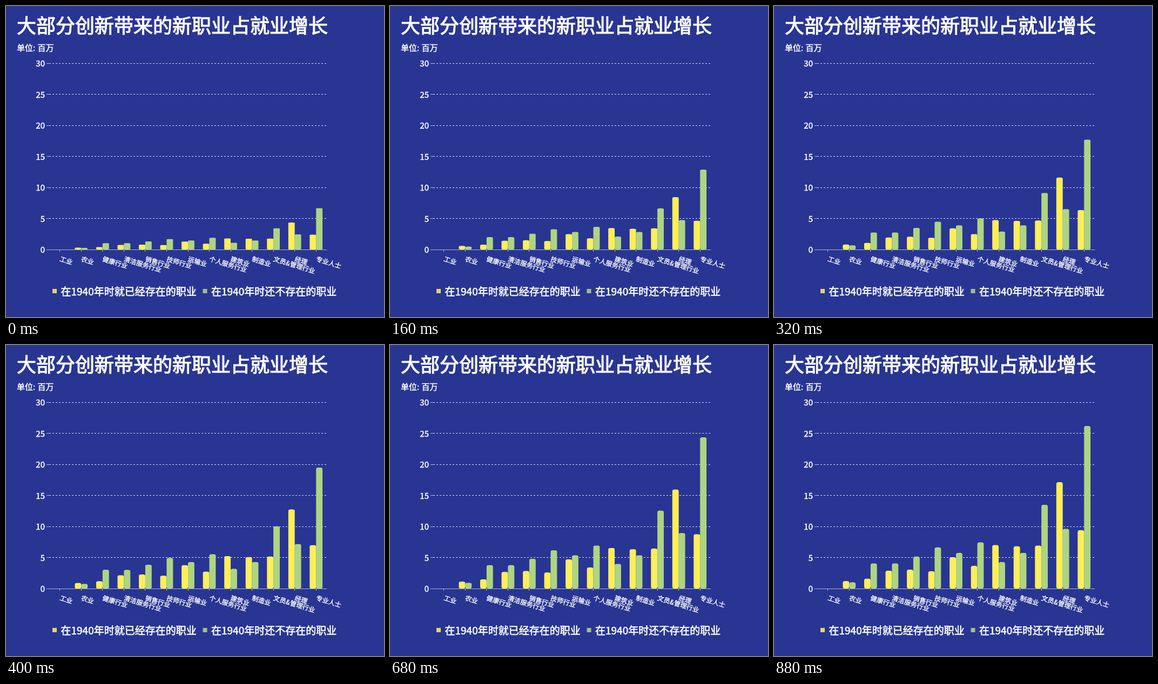
These frames come from a looping animation (700 px wide and 576 px high, 2880 ms). An HTML page:

```html
<!DOCTYPE html>
<html lang="zh-CN">
<head>
<meta charset="utf-8">
<style>
  html, body { margin: 0; width: 100%; height: 100%; overflow: hidden; background: #283593; }
  svg { display: block; }
  /* a thin outline gives the regular face a medium weight */
  text {
    fill: #fff; stroke: #fff; stroke-width: .032em; word-spacing: .06em;
    font-family: "Noto Sans CJK SC", "Noto Sans CJK", sans-serif;
  }
  line { stroke-width: 1; }
</style>
</head>
<body>
<svg id="stage" width="700" height="576" viewBox="0 0 700 576"></svg>
<script>
const LOOP = 2880, STEP = 40;
const LEFT = 80, RIGHT = 594, BASE = 451, UNIT = 11.5;
const YELLOW = '#ffee58', GREEN = '#aed581', AXIS = '#a9b3d3', GRID = '#d9dcec';

// label, final bar heights in pixels (existing jobs, new jobs)
const jobs = [
  ['工业', 0, 0], ['农业', 13.7, 11.4], ['健康行业', 18.2, 46.6],
  ['清洁服务行业', 33, 46.5], ['销售行业', 35, 59.2], ['技师行业', 32, 76.2],
  ['运输业', 58, 66], ['个人服务行业', 42, 85.5], ['建筑业', 80.6, 49],
  ['制造业', 78.3, 66], ['文员&amp;管理行业', 79.6, 155],
  ['经理', 197, 110.6], ['专业人士', 108, 301]
];
const band = (RIGHT - LEFT) / jobs.length, barWidth = band * 0.3;

// growth of the bars over time: [ms, share of final height]
const growth = [[0, .254], [80, .377], [240, .596], [400, .744], [560, .862], [680, .93], [880, 1]];

const text = (x, y, size, str, extra = '') =>
  `<text x="${x}" y="${y}" font-size="${size}" ${extra}>${str}</text>`;
const line = (x1, y1, x2, y2, color, extra = '') =>
  `<line x1="${x1}" y1="${y1}" x2="${x2}" y2="${y2}" stroke="${color}" ${extra}/>`;
const rect = (x, y, w, h, color, extra = '') =>
  `<rect x="${x}" y="${y}" width="${w}" height="${h}" fill="${color}" ${extra}/>`;

let grid = '', bars = '', labels = '';
for (let v = 0; v <= 30; v += 5) {
  const y = BASE - v * UNIT, row = Math.floor(y) + 0.5;
  grid += text(72, Math.round(y) + 6, 15, v, 'text-anchor="end"') + line(75, row, LEFT, row, AXIS);
  if (v) grid += line(LEFT, row, RIGHT, row, GRID, 'stroke-dasharray="3 3"');
}
jobs.forEach(([name, oldH, newH], i) => {
  const x = LEFT + band * (i + 0.5);
  const round = 'rx="3.5"';
  if (oldH) {
    bars += rect(x - barWidth, -oldH, barWidth, oldH, YELLOW, round)
          + rect(x, -newH, barWidth, newH, GREEN, round);
  }
  const tick = Math.floor(x) + 0.5;
  labels += line(tick, BASE, tick, BASE + 4, AXIS)
          + text(0, 0, 12, name, `transform="translate(${x - 1} 472.2) rotate(17)"`);
});

document.getElementById('stage').innerHTML =
  text(20, 50, 36, '大部分创新带来的新职业占就业增长') +
  text(20, 83, 15, '单位: 百万') +
  grid + `<g id="bars">${bars}</g>` +
  line(LEFT, BASE + 0.5, RIGHT, BASE + 0.5, AXIS) + labels +
  rect(86, 524, 8, 8, YELLOW, 'opacity=".88"') + text(101.5, 536, 19, '在1940年时就已经存在的职业') +
  rect(364.5, 524, 8, 8, GREEN, 'opacity=".88"') + text(380, 536, 19, '在1940年时还不存在的职业');

function slope(i) {
  const [t0, p0] = growth[Math.max(i - 1, 0)];
  const [t1, p1] = growth[Math.min(i + 1, growth.length - 1)];
  return (p1 - p0) / (t1 - t0);
}

// smooth cubic curve through the growth points
function grown(t) {
  if (t >= 880) return 1;
  const i = growth.findIndex(([end]) => t < end) - 1;
  const [t0, p0] = growth[i], [t1, p1] = growth[i + 1];
  const d = t1 - t0, u = (t - t0) / d, w = 1 - u;
  return w * w * ((1 + 2 * u) * p0 + u * d * slope(i))
       + u * u * ((3 - 2 * u) * p1 - w * d * slope(i + 1));
}

const barGroup = document.getElementById('bars');
const start = performance.now();
function draw() {
  const t = Math.floor((performance.now() - start) % LOOP / STEP) * STEP;
  barGroup.setAttribute('transform', `translate(0 ${BASE}) scale(1 ${grown(t)})`);
  requestAnimationFrame(draw);
}
draw();
</script>
</body>
</html>
```
